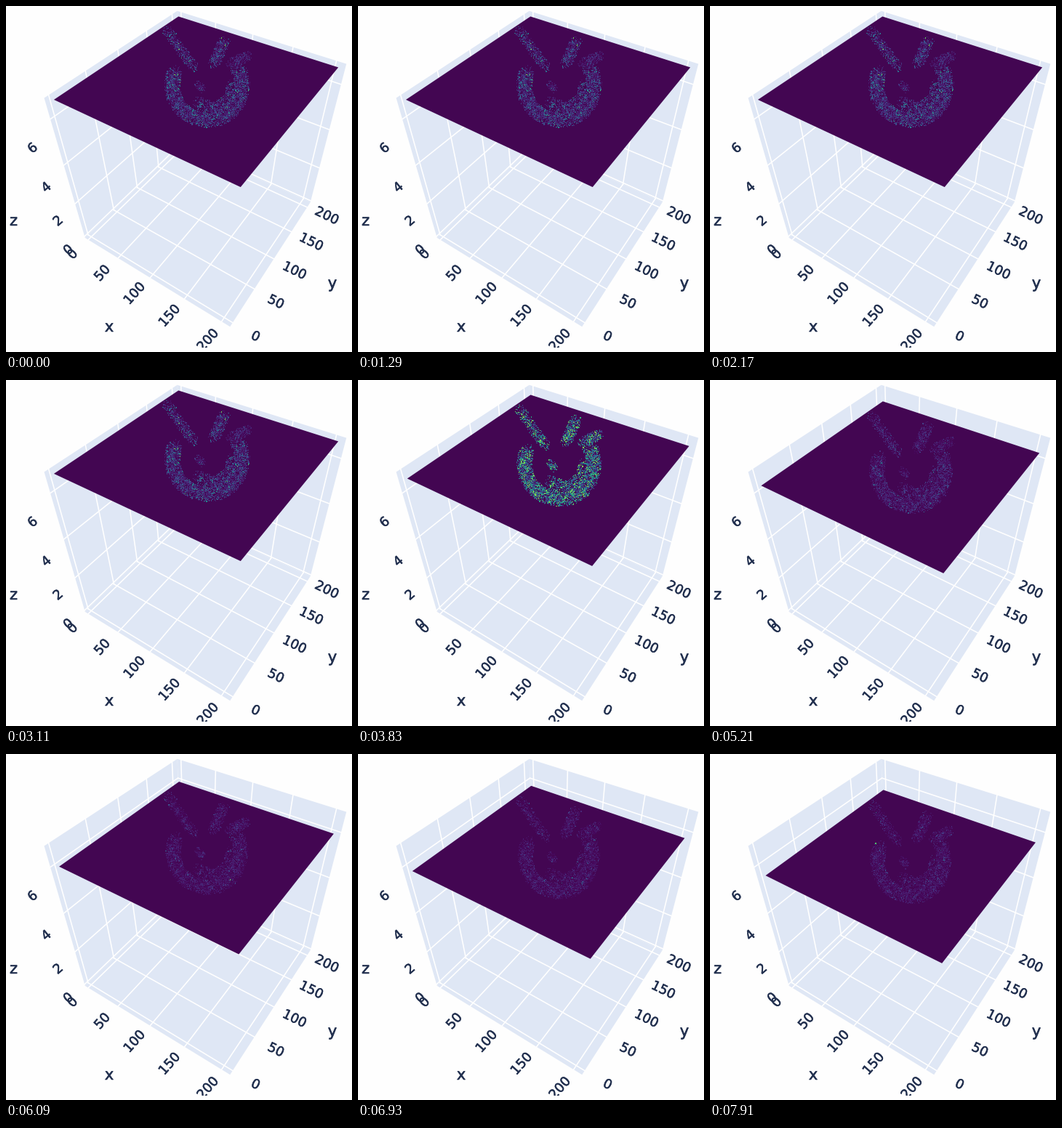
Recreate the animation shown at these times as a matplotlib script. Size 476 by 476 pixels, loop 8 s.

```python
import numpy as np
import matplotlib.pyplot as plt
from matplotlib.animation import FuncAnimation
from matplotlib.patheffects import withStroke

SIZE, DPI = 476, 100
INTERVAL, FRAMES = 40, 200
PAD, UNIT = 0.026, 0.00462          # box fractions: first tick, one data unit
LO, HI = 0.027, 0.973               # extent of the slice inside the box
Z_TOP, Z_STEP = 6.7, 0.09
SLIDE_START, SLIDE_PERIOD = 3380, 384
PLANE, WALL, INK, PAPER = "#430652", "#dfe7f5", "#22304f", "#fefefe"


def z_frac(z):
    return (z + 0.1) / 6.9


def fit_camera(anchors):
    """Solve a perspective matrix from (box point, pixel) pairs."""
    rows, rhs = [], []
    for (x, y, z), (px, py) in anchors:
        rows.append([x, y, z, 1, 0, 0, 0, 0, -px * x, -px * y, -px * z])
        rows.append([0, 0, 0, 0, x, y, z, 1, -py * x, -py * y, -py * z])
        rhs += [px, py]
    solution = np.linalg.lstsq(np.array(rows), np.array(rhs), rcond=None)[0]
    return np.append(solution, 1).reshape(3, 4)


top = z_frac(Z_TOP)
CAMERA = fit_camera([
    ((0, 0, 1), (52, 128)), ((0, 1, 1), (237, 7)), ((1, 1, 1), (468, 80)),
    ((0, 0, 0), (108, 318)), ((1, 0, 0), (310, 441)), ((1, 1, 0), (418, 271)),
    ((LO, LO, top), (66, 129)), ((LO, HI, top), (237, 14)),
    ((HI, HI, top), (457, 83)), ((HI, LO, top), (322, 249)),
])


def project(points):
    points = np.asarray(points, float)
    out = np.c_[points, np.ones(len(points))] @ CAMERA.T
    return out[:, :2] / out[:, 2:]


def at_height(xy, z):
    return project(np.c_[xy, np.full(len(xy), z_frac(z))])


def to_slice(pixels):
    """Box x and y of pixels lying on the top slice."""
    plane = CAMERA[:, [0, 1, 3]].copy()
    plane[:, 2] += CAMERA[:, 2] * top
    out = np.linalg.solve(plane, np.c_[pixels, np.ones(len(pixels))].T).T
    return out[:, :2] / out[:, 2:]


fig = plt.figure(figsize=(SIZE / DPI, SIZE / DPI), dpi=DPI, facecolor=PAPER)
ax = fig.add_axes([0, 0, 1, 1])
ax.set(xlim=(0, SIZE), ylim=(SIZE, 0))
ax.axis("off")


def line(a, b):
    x, y = project([a, b]).T
    ax.plot(x, y, color="white", lw=1.15, zorder=2)


def label(text, x, y, angle=0, size=18):
    ax.text(x, y, text, rotation=angle, color=INK, fontsize=size * 72 / DPI,
            family="DejaVu Sans", ha="center", va="center", zorder=3,
            path_effects=[withStroke(linewidth=0.4, foreground=INK)])


def tick_labels(values, first, last, depth, angle):
    """Space labels in perspective between two pixels."""
    for value, q in zip(values, np.linspace(0, 1, len(values))):
        near, far = 1 - q, q * depth
        x, y = (near * np.array(first) + far * np.array(last)) / (near + far)
        label(str(value), x, y, angle)


# Box: floor and the two far walls
for corners in ([(0, 0, 0), (1, 0, 0), (1, 1, 0), (0, 1, 0)],
                [(0, 0, 0), (0, 1, 0), (0, 1, 1), (0, 0, 1)],
                [(0, 1, 0), (1, 1, 0), (1, 1, 1), (0, 1, 1)]):
    ax.fill(*project(corners).T, color=WALL, lw=0, zorder=1)

XY_TICKS, Z_TICKS = range(0, 201, 50), range(0, 7, 2)
for value in XY_TICKS:
    f = PAD + value * UNIT
    line((f, 0, 0), (f, 1, 0))
    line((f, 1, 0), (f, 1, 1))
    line((0, f, 0), (1, f, 0))
    line((0, f, 0), (0, f, 1))
for value in Z_TICKS:
    f = z_frac(value)
    line((0, 0, f), (0, 1, f))
    line((0, 1, f), (1, 1, f))

tick_labels(XY_TICKS, (92, 342), (278, 460), 0.842, 48)
tick_labels(XY_TICKS, (343, 455), (441, 289), 1.2, -26)
tick_labels(Z_TICKS, (86, 336), (37, 196), 0.8, 40)
label("x", 142, 442, size=21)
label("y", 449, 382, size=21)
label("z", 10.5, 296, size=21)
ax.fill([0, SIZE, SIZE, 0], [470, 470, SIZE, SIZE], color=PAPER, lw=0, zorder=4)

rng = np.random.default_rng(7)


def streak(start, end):
    return lambda q: np.outer(1 - q, start) + np.outer(q, end)


def arc(centre, radius, begin, end):
    def path(q):
        a = np.radians(begin + (end - begin) * q)
        return np.array(centre) + radius * np.c_[np.cos(a), np.sin(a)]
    return path


def cloud(path, width, density=0.8):
    """Random dots around a path, as many as its area asks for."""
    length = np.hypot(*np.diff(path(np.linspace(0, 1, 50)), axis=0).T).sum()
    count = int(density * 2 * width * length)
    angle = rng.uniform(0, 2 * np.pi, count)
    radius = width * np.sqrt(rng.uniform(0, 1.2, count))
    offset = radius[:, None] * np.c_[np.cos(angle), np.sin(angle)]
    return path(rng.uniform(0, 1, count)) + offset


steady = np.vstack([
    cloud(arc((277, 109), 48, -28, 202), 10),
    cloud(arc((284, 112), 28, -10, 130), 9, 0.5),
    cloud(streak((222, 34), (258, 84)), 7, 0.5),
    cloud(streak((300, 49), (286, 80)), 8),
])
flashing = np.vstack([
    cloud(streak((334, 68), (310, 79)), 7),
    cloud(streak((264, 106), (271, 116)), 5),
])
dots = np.vstack([steady, flashing])
sharpness = np.repeat([1, 2], [len(steady), len(flashing)])
patches = 1 + 0.5 * np.sin(0.37 * dots[:, 0]) * np.sin(0.31 * dots[:, 1])
dots_xy = to_slice(dots)
square = np.array([(LO, LO), (LO, HI), (HI, HI), (HI, LO)])


def tissue_colors(level):
    grain = np.random.default_rng(20 + level).lognormal(0, 0.6, len(dots))
    bump = np.exp(-((level - 2) / 1.8) ** 2) ** sharpness
    strength = 0.05 + 0.3 * bump
    return plt.cm.viridis(np.clip(strength * patches * grain, 0, 0.8))


slab = ax.fill(*at_height(square, Z_TOP).T, color=PLANE, lw=0, zorder=5)[0]
tissue = ax.scatter(*dots.T, s=0.8, marker="s", lw=0, zorder=6)


def update(frame):
    level = max(0, (frame * INTERVAL - SLIDE_START) // SLIDE_PERIOD + 1)
    z = Z_TOP - Z_STEP * level
    slab.set_xy(at_height(square, z))
    tissue.set_offsets(at_height(dots_xy, z))
    tissue.set_facecolor(tissue_colors(level))
    return slab, tissue


animation = FuncAnimation(fig, update, frames=FRAMES, interval=INTERVAL,
                          repeat=True, repeat_delay=0)
plt.show()
```
